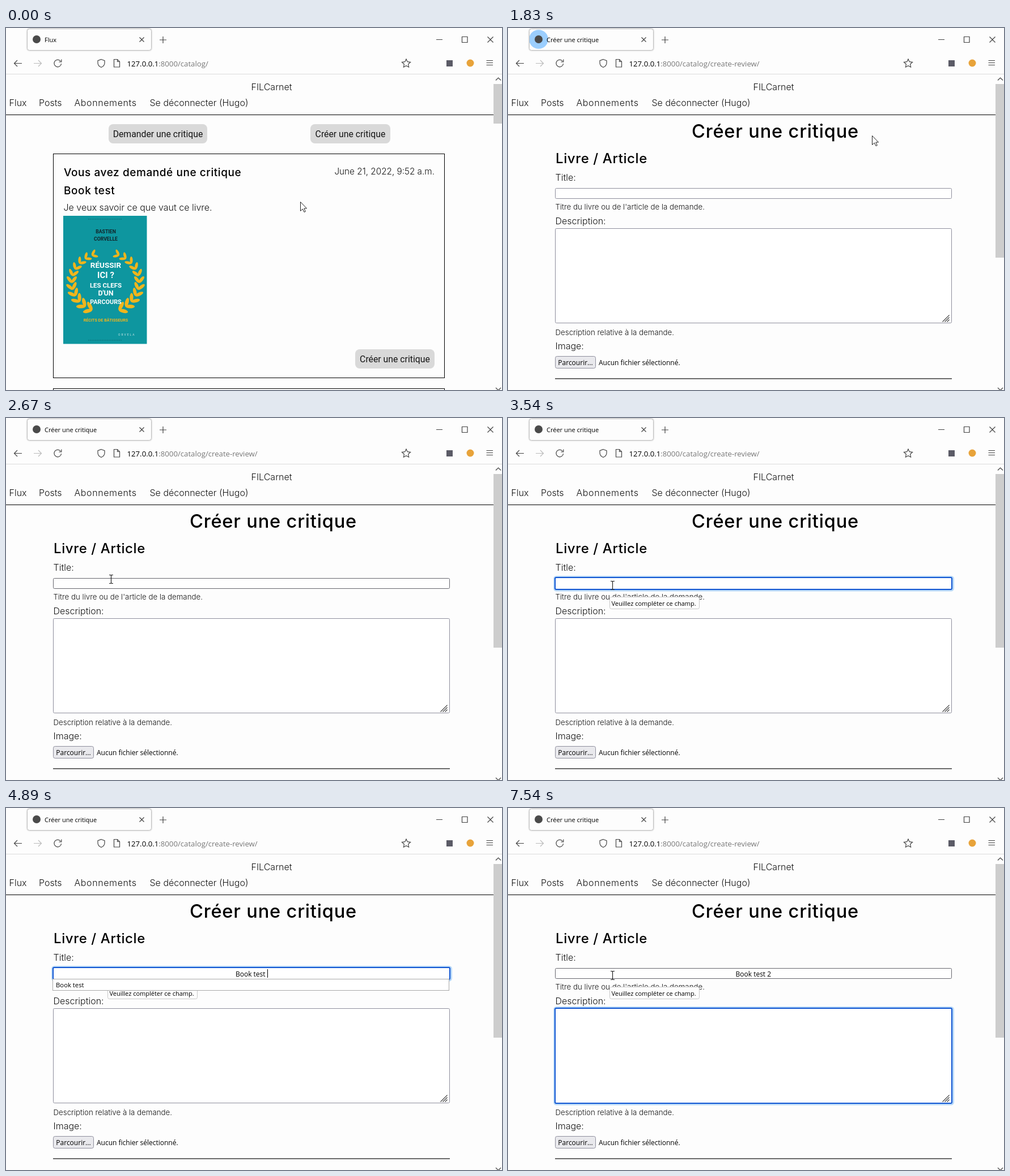
An HTML page that plays this animation: 875x640 px, repeating every 8000 ms.

```html
<!DOCTYPE html>
<html lang="fr">
<head>
<meta charset="utf-8">
<title>Créer une critique</title>
<style>
html, body { margin: 0; width: 100%; height: 100%; overflow: hidden; background: #fdfdfd; }
svg { display: block; width: 875px; height: 640px; }
text { white-space: pre; fill: #151515; }
.page { font: 400 16px Inter, sans-serif; font-optical-sizing: none; font-weight: 350; }
.help { font-size: 13.3px; }
.date { font-size: 15.3px; }
.h1, .h2, .h3 { font-family: Inter, sans-serif; font-optical-sizing: none; font-weight: 500; fill: #000; }
.h1 { font-size: 32.6px; letter-spacing: .025em; }
.h2 { font-size: 24px; letter-spacing: .025em; }
.h3 { font-size: 19px; letter-spacing: .03em; font-weight: 550; }
.button { font: 15.8px Roboto, sans-serif; }
.ui { font: 11px "Open Sans", sans-serif; fill: #000; }
.list { font-size: 11.3px; }
.field { font-size: 12px; }
.url { font-size: 13.2px; }
.cover { font: 700 8.5px Roboto, sans-serif; }
.line { fill: none; stroke: #444; stroke-width: 1.2; }
.mid { text-anchor: middle; }
.end { text-anchor: end; }
</style>
</head>
<body>
<svg id="stage" viewBox="0 0 875 640"></svg>
<script>
const LOOP = 8000, PAGE_SWITCH = 1680;
const stage = document.getElementById('stage');

const text = (x, y, content, cls = 'page', attrs = '') =>
  `<text x="${x}" y="${y}" class="${cls}" ${attrs}>${content}</text>`;
const rect = (x, y, w, h, fill, stroke = 'none', attrs = '') =>
  `<rect x="${x}" y="${y}" width="${w}" height="${h}" fill="${fill}" stroke="${stroke}" ${attrs}/>`;
const line = (d, attrs = '') => `<path class="line" d="${d}" ${attrs}/>`;
const group = (id, ...parts) => `<g id="${id}">${parts.join('')}</g>`;
const button = (x, y, w, label, id) => group(id,
  rect(x, y, w, 34, '#d9d9d9', 'none', 'rx="8"'),
  text(x + w / 2, y + 23, label, 'button mid'));
const focusRing = (id, y, h) => group(id,
  rect(81.5, y - 1.5, 704, h + 3.5, 'none', '#b8d9f8', 'stroke-width="3" rx="4"'),
  rect(83, y, 700, h, '#fff', '#1055d2', 'stroke-width="2" rx="2"'));

const laurel = () => {
  let leaves = '';
  for (let i = 0; i < 11; i++) {
    const angle = (114 + i * 13.2) * Math.PI / 180;
    const x = 176 + 60 * Math.cos(angle), y = 450 + 53 * Math.sin(angle);
    const tangent = 114 + i * 13.2 + 90, size = 1.12 - i * .035;
    for (const tilt of [-38, 38])
      leaves += `<ellipse cx="7" rx="7.5" ry="3" transform="translate(${x} ${y}) rotate(${tangent + tilt}) scale(${size})"/>`;
  }
  return `<g id="branch" fill="#f0b51c">${leaves}</g><use href="#branch" transform="translate(351) scale(-1 1)"/>`;
};

const cover = () => {
  const row = (y, size, fill, content) =>
    text(176, y, content, 'cover mid', `style="font-size:${size}px;fill:${fill}"`);
  return rect(101, 332, 147.5, 226.5, '#0e969f') + laurel() +
    line('M145 338H205M145 552H205', 'style="stroke:#0b5d66;stroke-dasharray:2 1;stroke-width:.7"') +
    row(363, 8.7, '#12252b', 'BASTIEN') + row(376, 8.7, '#12252b', 'CORVELLE') +
    row(424, 13.5, '#fff', 'RÉUSSIR') + row(442, 15, '#fff', 'ICI ?') +
    row(459, 11.5, '#fff', 'LES CLEFS') + row(473, 12.5, '#fff', "D'UN") +
    row(488, 10.8, '#fff', 'PARCOURS') + row(519, 7.2, '#f0b51c', 'RÉCITS DE BÂTISSEURS') +
    text(198, 544, 'ORVELA', 'cover', 'style="font-size:5px;font-weight:400;letter-spacing:2px;fill:#cfe9ea"');
};

const browser = group('browser',
  '<clipPath id="tabClip"><rect x="38" y="2" width="218" height="37" rx="4"/></clipPath>',
  rect(36.5, .5, 221, 40, 'none', '#ececec', 'rx="5" stroke-width="2"'),
  rect(37.5, 1.5, 219, 38, '#fdfdfd', '#bcbcbc', 'rx="4"'),
  '<circle id="burst" cx="54" cy="20" fill="#7fc1ff" clip-path="url(#tabClip)"/>',
  '<circle cx="54" cy="20" r="7" fill="#4a4a4a"/>',
  text(68, 25, '', 'ui', 'id="tabTitle"'),
  line('M235.500 16.500l8 8m0-8l-8 8M271 21h12M277 15v12M759 20.500h11M849.500 15.500l10 10m0-10l-10 10'),
  line('M804.500 15.500h9.500v10h-9.500z'),
  line('M28 62.500H14.500M20 57l-5.500 5.500 5.500 5.500'),
  line('M49 62.500H62M57 57l5.500 5.500-5.500 5.500', 'style="stroke:#bbb"'),
  line('M96.500 59a6.300 6.300 0 1 0 1 4M97.800 55.500v4.500h-4.500'),
  line('M168 55.500l6 2.200v4c0 4-3 6.500-6 7.800-3-1.300-6-3.800-6-7.800v-4z'),
  line('M190.500 55.500h6l4 4v9.500h-10zM196.500 55.500v4h4'),
  line('M706 55l2.200 4.700 5.300.7-3.900 3.600 1 5.200-4.600-2.500-4.600 2.500 1-5.200-3.900-3.600 5.300-.7z'),
  rect(777, 57, 11, 11, '#5b5b66'),
  '<circle cx="819" cy="62" r="6.500" fill="#e8a33a"/>',
  line('M847.500 57.500h11.500M847.500 61.500h11.500M847.500 65.500h11.500'),
  text(213.5, 67.5, '127.0.0.1<tspan fill="#777">:8000/catalog/<tspan id="urlEnd"></tspan></tspan>', 'ui url'),
  rect(0, 81, 875, 1, '#dcdcdc'));

const header = group('header',
  text(468.5, 110, 'FILCarnet', 'page mid'),
  text(5.5, 137.5, 'Flux'), text(58, 137.5, 'Posts'),
  text(120.5, 137.5, 'Abonnements', 'page', 'letter-spacing=".6"'),
  text(253.5, 137.5, 'Se déconnecter (Hugo)'),
  rect(0, 153, 860, 1, '#000'),
  rect(860, 99, 15, 70, '#cdcdcd', 'none', 'id="thumb"'),
  line('M864 92.500l4.500-4.500 4.500 4.500M864 636l4.500 4.500 4.500-4.500', 'stroke-width="2"'));

const feed = group('feed',
  button(181, 170, 174, 'Demander une critique', 'ask'),
  button(537, 170, 141, 'Créer une critique', 'create'),
  rect(83.5, 222.5, 690, 396, 'none', '#000'),
  rect(83.5, 637.5, 690, 10, 'none', '#000'),
  text(102, 262, 'Vous avez demandé une critique', 'h3'),
  text(756, 259, 'June 21, 2022, 9:52 a.m.', 'page date end'),
  text(102, 294, 'Book test', 'h3'),
  text(101.5, 323, 'Je veux savoir ce que vaut ce livre.'),
  cover(),
  button(616, 568, 140, 'Créer une critique', 'reply'),
  group('status',
    rect(-.5, 620.5, 226, 20, '#f4f4f6', '#cfcfd4', 'rx="2"'),
    text(5, 635, '127.0.0.1:8000/catalog/create-review/', 'ui')));

const form = group('form',
  text(471.5, 194, 'Créer une critique', 'h1 mid'),
  text(84, 239, 'Livre / Article', 'h2'),
  text(83.5, 270, 'Title:'),
  rect(83.5, 283.5, 699, 18, '#fff', '#8f8f9d', 'rx="2" id="titleBox"'),
  focusRing('titleFocus', 282, 21),
  text(432.8, 297.5, '', 'ui field mid', 'id="titleText"'),
  text(83.5, 321, "Titre du livre ou de l'article de la demande.", 'page help'),
  text(83.5, 346.5, 'Description:'),
  rect(83.5, 354.5, 699, 167, '#fff', '#8f8f9d', 'rx="2"'),
  focusRing('descFocus', 354, 168),
  line('M766.500 519.500l12-12M770.500 519.500l8-8M774.500 519.500l4-4'),
  text(83.5, 543, 'Description relative à la demande.', 'page help'),
  text(83.5, 568, 'Image:'),
  rect(83.5, 580.5, 71, 21, '#e9e9ed', '#8f8f9d', 'rx="3"'),
  text(119, 596, 'Parcourir...', 'ui field mid'),
  text(160, 596, 'Aucun fichier sélectionné.', 'ui field'),
  rect(83, 619, 700, 2, '#6a6a6a'),
  group('tooltip',
    rect(179.5, 316.5, 158, 21, '#fdfdfd', '#c8c8c8', 'rx="3"'),
    text(182.5, 332, 'Veuillez compléter ce champ.', 'ui')),
  group('list',
    rect(82.5, 302.5, 699, 59, '#fff', '#a8a8a8', 'id="listBox"'),
    text(88, 317, 'Im a book', 'ui list', 'id="row1"'),
    text(88, 336.5, 'Book test', 'ui list', 'id="row2"'),
    text(88, 356, 'Tidy Logic: A Companion to Modern Program Construction', 'ui list', 'id="row3"')),
  rect(0, 0, 1, 15, '#000', 'none', 'id="caret"'));

const pointers = group('pointer',
  '<path id="arrow" d="M.5 .5V16.500L4.300 13 7 18.500 9.300 17.500 6.800 12H11.500Z" fill="#fff" stroke="#222"/>',
  '<path id="hand" d="M-1.500 15V1.500a1.700 1.700 0 0 1 3.400 0V8c0-2 3-2 3 .5 0-2 3-1.500 3 .5 0-1.500 2.600-1 2.600 1v5c0 3-1.500 4-1.500 7H-.5c0-3-6-7-6.500-9.500-.3-2 2-2.300 3-1l2.500 3" fill="#fff" stroke="#111" stroke-width="1.200"/>',
  '<path id="beam" class="line" d="M-3 -7.500h2.500l1 1 1-1H4M.5-6.500v13M-3 7.500h2.500l1-1 1 1H4" style="stroke:#222"/>');

stage.innerHTML = rect(0, 0, 875, 640, '#fdfdfd') + browser + header + feed + form + pointers;

const el = id => document.getElementById(id);
const set = (id, attrs) => { for (const k in attrs) el(id).setAttribute(k, attrs[k]); };
const show = (id, on) => { el(id).style.display = on ? '' : 'none'; };
const write = (id, content) => { if (el(id).textContent !== content) el(id).textContent = content; };
const clamp = v => Math.max(0, Math.min(1, v));

// time, x, y of the pointer's hot spot
const route = [
  [0, 519, 307], [100, 519, 307], [230, 511, 345], [340, 545, 375], [470, 640, 355],
  [580, 722, 300], [670, 724, 225], [750, 690, 160], [820, 671, 167], [960, 671, 167],
  [1070, 656, 182], [1360, 642, 190], [1860, 642, 190], [2180, 300, 262], [2390, 300, 262],
  [2670, 185, 285], [3000, 184, 296], [LOOP, 184, 296]
];

function pointerAt(t) {
  const i = route.findIndex((p, n) => n + 1 === route.length - 1 || t < route[n + 1][0]);
  const a = route[i], b = route[i + 1];
  const before = route[i - 1] || a, after = route[i + 2] || b;
  const u = (t - a[0]) / (b[0] - a[0]);
  return [1, 2].map(k => {
    if (a[1] === b[1] && a[2] === b[2]) return a[k];
    const m0 = (b[k] - before[k]) / 2, m1 = (after[k] - a[k]) / 2, d = b[k] - a[k];
    return Math.round(a[k] + u * (m0 + u * (3 * d - 2 * m0 - m1 + u * (m0 + m1 - 2 * d))));
  });
}

const typed = 'Book test 2';
const keyTimes = [3790, 3880, 3990, 4080, 4280, 4390, 4480, 4590, 4700, 4810, 5640];
const CLICK = 2760, TAB = 5990, BLINK = 530;

function draw(t) {
  const onForm = t >= PAGE_SWITCH;
  show('feed', !onForm);
  show('form', onForm);
  write('tabTitle', onForm ? 'Créer une critique' : 'Flux');
  write('urlEnd', onForm ? 'create-review/' : '');
  set('thumb', { height: onForm ? 307 : 70 });

  const burst = (t - 1740) / 400;
  show('burst', burst >= 0 && burst < 1);
  set('burst', { r: 10 + 30 * clamp(burst), opacity: 1 - clamp(burst) });

  const hover = t >= 1010 && !onForm;
  el('create').firstChild.setAttribute('fill', hover ? '#ababab' : '#d9d9d9');
  el('create').lastChild.style.fill = hover ? '#777' : '';
  set('status', { opacity: t < 1610 ? clamp((t - 1150) / 120) : 0 });

  const count = keyTimes.filter(k => k <= t).length;
  write('titleText', typed.slice(0, count));
  show('titleFocus', t >= CLICK && t < TAB);
  show('descFocus', t >= TAB);
  set('titleBox', { stroke: t >= 2600 ? '#67676f' : '#8f8f9d' });
  show('tooltip', t >= 3540);

  const narrowed = t >= 4390;
  show('list', t >= 3820 && t < 5700);
  set('listBox', { height: narrowed ? 20 : 59 });
  set('row2', { y: narrowed ? 317 : 336.5 });
  show('row1', !narrowed);
  show('row3', !narrowed);

  const inDesc = t >= TAB;
  const lastKey = inDesc ? 5950 : count ? keyTimes[count - 1] : CLICK;
  const caretOn = t >= CLICK && (t < 5860 || inDesc) && (t - lastKey) % (2 * BLINK) < BLINK;
  show('caret', caretOn);
  if (caretOn) {
    const half = inDesc || !count ? 0 : el('titleText').getComputedTextLength() / 2;
    set('caret', { x: inDesc ? 85 : Math.round(433 + half), y: inDesc ? 356 : 285 });
  }

  const [x, y] = pointerAt(t);
  const overField = t > 2390 && y > 275;
  set('pointer', { transform: `translate(${x} ${y})` });
  show('pointer', t < 3790 || t >= 6200);
  show('arrow', !hover && !overField);
  show('hand', hover);
  show('beam', overField);
}

function tick() {
  draw(performance.now() % LOOP);
  requestAnimationFrame(tick);
}
tick();
</script>
</body>
</html>
```
